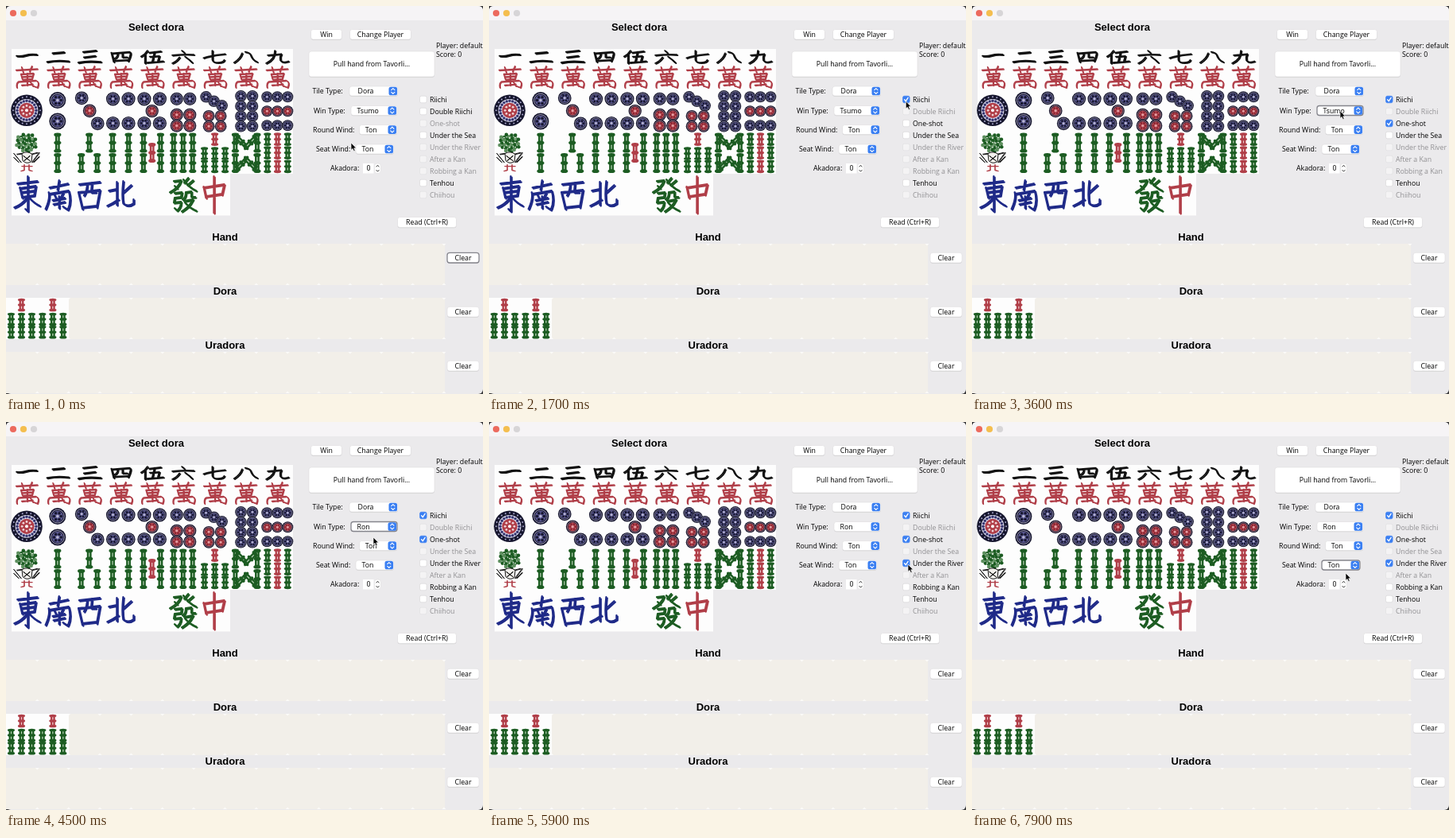
An HTML page that plays this animation: 600x488 px, repeating every 8 s.

```html
<!DOCTYPE html>
<html lang="en">
<head>
<meta charset="utf-8">
<title>Select dora</title>
<style>
html, body { margin: 0; width: 100%; height: 100%; overflow: hidden; background: #3a3a3c; }
svg { display: block; width: 600px; height: 488px; }
text { font: 500 8.75px "Open Sans", "Noto Sans", sans-serif; fill: #000; white-space: pre; }
text.head { font: bold 13px "Liberation Sans", Arial, sans-serif; text-anchor: middle; }
.mid { text-anchor: middle; }
</style>
</head>
<body>
<svg id="stage" viewBox="0 0 600 488" xmlns="http://www.w3.org/2000/svg"></svg>
<script>
const NS = 'http://www.w3.org/2000/svg';
const stage = document.getElementById('stage');
const W = 39.35, H = 52.3, X0 = 7, Y0 = 54;
const RED = '#b03e48', GREEN = '#1c5c22', BLUE = '#1f2a88', INK = '#111', NAVY = '#16162e', LILAC = '#5c5a92';

function add(parent, tag, attrs, content) {
  const el = document.createElementNS(NS, tag);
  for (const k in attrs) el.setAttribute(k, attrs[k]);
  if (content !== undefined) el.textContent = content;
  parent.appendChild(el);
  return el;
}
const rect = (p, x, y, width, height, fill, more) => add(p, 'rect', { x, y, width, height, fill, ...more });
const circle = (p, cx, cy, r, fill, more) => add(p, 'circle', { cx, cy, r, fill, ...more });
const label = (x, y, s, cls = '') => add(stage, 'text', { x, y, class: cls }, s);
const group = (p, x, y, turn = 0) => add(p, 'g', { transform: `translate(${x} ${y}) rotate(${turn})` });

// A flat nib: the same line laid down twice, slightly shifted
function brush(p, d, color, width, nib) {
  for (const s of [-nib / 2, nib / 2]) {
    add(p, 'path', { d, fill: 'none', stroke: color, 'stroke-width': width, 'stroke-linecap': 'round',
      'stroke-linejoin': 'round', transform: `translate(${s} ${s})` });
  }
}

function dot(p, x, y, r, red) {
  const g = group(p, x, y), pale = red ? '#e3a9ac' : '#b9b7d2';
  circle(g, 0, 0, r, NAVY);
  circle(g, 0, 0, r * .8, 'none', { stroke: pale, 'stroke-width': r * .08 });
  circle(g, 0, 0, r * .66, red ? '#c0505a' : LILAC);
  for (let a = 0; a < 6; a++) {
    const c = Math.cos(a * Math.PI / 3), s = Math.sin(a * Math.PI / 3);
    circle(g, r * .42 * c, r * .42 * s, r * .17, red ? '#8a2631' : NAVY);
  }
  circle(g, 0, 0, r * .17, pale);
}

function stick(p, x, y, h, red, turn) {
  const g = group(p, x, y, turn), c = red ? RED : GREEN, e = h / 2 - 1.8;
  rect(g, -2.9, -e, 5.8, 2 * e, c, { rx: 1.5 });
  for (const n of [-e, 0, e]) add(g, 'ellipse', { cx: 0, cy: n, rx: 4.6, ry: h > 18 ? 2.3 : 1.9, fill: c });
  for (const n of [-e / 2, e / 2]) rect(g, -.6, n - e * .26, 1.2, e * .52, red ? '#ecc8ca' : '#b9d2b6', { rx: .6 });
}

const numerals = [
  'M7 11Q12 12 18 10T32 9',
  'M13 7L27 5.5M6 20Q18 17 33 19',
  'M12 5L28 3M13 13L27 11M6 21Q18 18 34 20',
  'M8 6L11 20M9 7L31 5Q34 6 29 19M11 18L29 17M16 7Q16 13 12 15M22 6L22 13L28 13',
  'M14 3Q11 9 6 12M11 9L11 22M16 6L31 4M23 5L20 20M17 12L29 11L27 20M13 21L34 19',
  'M18 3L21 6M6 10Q20 8 33 9M15 13Q12 19 6 22M22 12Q27 16 31 21',
  'M6 14Q18 9 33 8M17 3L17 16Q17 21 24 21Q31 21 32 17',
  'M15 7Q13 15 5 21M19 5Q25 6 26 10Q28 17 34 20',
  'M8 10L25 8Q23 12 24 18Q27 22 34 19M17 3Q17 16 6 22'
];
const myriad = 'M6 27L33 25.5M13 23L15 30M26 22L23 29M12 32L14 39L26 38L28 31ZM13 35.5L27 34.5M20 31L20 46' +
  'M7 49Q6 43 9 41.5L31 40Q36 42 33 49L28 47M13 46L27 44.5M24 42L27 47';
const honors = [
  [BLUE, 'M8 13L33 10M11 18L14 31M11 19L31 16L29 28M13 24L30 22M14 30L29 28M21 4L21 48L18 45M20 31Q13 40 4 43M22 30Q29 38 36 41'],
  [BLUE, 'M9 18L32 13M21 9L19 21M8 24Q10 32 4 45M9 26L33 22Q37 35 32 46L26 42M15 27L17 31M26 25L23 31M13 34L28 31M14 39L28 36M21 29L21 44'],
  [BLUE, 'M7 14L33 11M17 13Q17 22 13 28M23 12L22 24L28 24M6 24L11 45M6 24L33 21L29 43M11 43L29 41'],
  [BLUE, 'M15 11L15 40M5 22L15 20M3 41Q10 38 17 33M33 15L23 24M23 10Q21 29 23 38Q29 43 36 38L36 33'],
  null,
  [GREEN, 'M8 10L17 9Q14 18 3 24M9 16L12 19M26 6L21 12M32 9L25 15M20 8Q27 18 36 22M9 25L18 24L17 30L9 31L8 37L17 36' +
    'Q17 43 12 47L9 44M23 24Q23 31 19 33M23 24L30 23L30 30L35 30M21 35L32 33Q28 42 18 48M22 37Q28 44 36 47'],
  [RED, 'M6 17L9 31M6 18L32 14L29 27M9 29L29 26M19 4L19 50']
];

function bigDot(g) {
  circle(g, 19, 25, 19.8, NAVY);
  circle(g, 19, 25, 14.4, '#d9d8ea');
  for (let i = 0; i < 20; i++) {
    const c = Math.cos(i * Math.PI / 10), s = Math.sin(i * Math.PI / 10);
    circle(g, 19 + 17 * c, 25 + 17 * s, 1, '#aaa8cc');
    circle(g, 19 + 12 * c, 25 + 12 * s, 1.7, '#34346e');
  }
  circle(g, 19, 25, 9.6, RED);
  for (let i = 0; i < 8; i++) {
    const a = i * Math.PI / 4;
    circle(g, 19 + 5.8 * Math.cos(a), 25 + 5.8 * Math.sin(a), 1.4, '#f0d5d8');
  }
  circle(g, 19, 25, 2, '#fff');
}

const dots = (g, xs, ys, r, red) => ys.forEach(y => xs.forEach(x => dot(g, x, y, r, red)));
const wide = [9.5, 29], mid = [11, 27.5];
const pins = [
  bigDot,
  g => dots(g, [18.5], [12.3, 38.7], 10.5),
  g => [9.5, 19.5, 29.5].forEach((x, i) => dot(g, x, 9.5 + i * 16, 8.4, i === 1)),
  g => dots(g, wide, [10.5, 41.2], 8.6),
  g => { dots(g, wide, [10.5, 41.2], 8.6); dot(g, 19.3, 25.8, 8.2, true); },
  g => { dots(g, mid, [10.5], 8.1); dots(g, mid, [30.5, 44.3], 8.1, true); },
  g => { [8.5, 18.5, 28.5].forEach((x, i) => dot(g, x, 8 + i * 5.5, 7.3)); dots(g, [12, 27], [32, 45], 7.4, true); },
  g => dots(g, [13, 27.5], [7, 19.6, 32.4, 45], 7.3),
  g => [8, 26, 44].forEach((y, r) => dots(g, [6.5, 19.5, 32.5], [y], 7, r === 1))
];

const sticks = (g, xs, ys, h, red) => ys.forEach(y => xs.forEach(x => stick(g, x, y, h, red)));

function bird(g) {
  for (let i = 0; i < 34; i++) {
    const a = i * 2.4, r = 2.05 * Math.sqrt(i);
    circle(g, 19 + r * Math.cos(a) * 1.15, 13.5 + r * Math.sin(a), 2.3, i % 3 ? GREEN : '#5d8f5e');
  }
  for (let i = 0; i < 9; i++) circle(g, 12 + i % 3 * 7, 7 + Math.floor(i / 3) * 6, .9, '#e7efe4');
  brush(g, 'M3 27L12 38M3 32L9 38M35 26L26 38M35 31L28 38M7 28L14 27M25 28L33 26', INK, 1, .6);
  add(g, 'path', { d: 'M13 27Q20 23 26 28L25 37Q19 41 14 36Z', fill: '#f3f1ed', stroke: INK, 'stroke-width': 1 });
  brush(g, 'M15 30L23 36M23 30L16 36', INK, 1, .3);
  brush(g, 'M16 41L16 48L12 49M22 41L22 48L26 49M13 43L26 43', RED, 1.1, .3);
}

const two = [13.5, 39];
const sous = [
  bird,
  g => sticks(g, [18.5], two, 24),
  g => { sticks(g, [19], [13.5], 24); sticks(g, [9, 29], [39], 24); },
  g => sticks(g, [9, 29], two, 24),
  g => { sticks(g, [8.5, 30], two, 24); stick(g, 19.3, 26, 24, true); },
  g => sticks(g, [7, 19, 31], two, 24),
  g => { stick(g, 19.5, 9, 16.5, true); sticks(g, [6.5, 19.5, 32.5], [27, 43.2], 16.5); },
  g => {
    sticks(g, [6, 33.5], two, 24);
    stick(g, 14.5, 13, 20, false, -45); stick(g, 25, 13, 20, false, 45);
    stick(g, 14.5, 39.5, 20, false, 45); stick(g, 25, 39.5, 20, false, -45);
  },
  g => { sticks(g, [7, 32.5], [9, 26, 43.2], 16.5); sticks(g, [19.7], [9, 26, 43.2], 16.5, true); }
];

// Window
rect(stage, 0, 0, 600, 488, '#ebeaec', { rx: 6 });
add(stage, 'path', { d: 'M0 18V6Q0 0 6 0H594Q600 0 600 6V18Z', fill: '#f6f4f6' });
['#ec6a5e', '#f4be4f', '#d7d5d7'].forEach((c, i) => circle(stage, 9 + 13 * i, 9, 4.1, c));
label(189, 31, 'Select dora', 'head');

// Tile chooser
rect(stage, X0, Y0, 354, 157, '#fdfdfd');
rect(stage, X0, Y0 + 156, 275, 53.5, '#fdfdfd');
for (let i = 0; i < 9; i++) {
  const cell = row => group(stage, X0 + i * W, Y0 + row * H);
  const man = cell(0);
  brush(add(man, 'g', { transform: 'scale(1 .84)' }), numerals[i], INK, i < 3 ? 2.5 : 2, 1.2);
  brush(man, myriad, RED, 1.5, .8);
  pins[i](cell(1));
  sous[i](cell(2));
  if (honors[i]) brush(cell(3), honors[i][1], honors[i][0], 2.3, 1.3);
}

// Buttons
function button(x, y, w, h, s) {
  rect(stage, x, y + .7, w, h, '#cfced0', { rx: 3 });
  const face = rect(stage, x, y, w, h, '#fff', { rx: 3, stroke: '#dddcde', 'stroke-width': .6 });
  label(x + w / 2, y + h / 2 + 3.2, s, 'mid');
  return face;
}
button(383.5, 29.5, 39, 12.5, 'Win');
button(432.5, 29.5, 77, 12.5, 'Change Player');
button(381, 57, 158, 32, 'Pull hand from Tavorli...');
button(492.5, 265.5, 74, 13, 'Read (Ctrl+R)');
label(541, 53, 'Player: default');
label(541, 63.5, 'Score: 0');

// Tile trays, with pale notches where the blank tiles meet
let clearFace;
['Hand', 'Dora', 'Uradora'].forEach((name, i) => {
  const y = 299 + 68 * i;
  label(275.5, y - 4, name, 'head');
  rect(stage, 0, y, 552, 52, '#f2efe9');
  for (let k = 1; k < 15; k++) {
    const x = k * W;
    add(stage, 'path', { d: `M${x - 2.5} ${y}h5l-2.5 2.5zM${x - 2.5} ${y + 52}h5l-2.5-2.5z`, fill: '#fbfaf8' });
  }
  const face = button(555, y + 11.3, 40, 12.7, 'Clear');
  if (!i) clearFace = face;
});
rect(stage, 0, 367, 79, 52, '#fdfdfd');
[0, W].forEach(x => sous[6](group(stage, x, 367)));

// Drop-downs
function combo(name, nx, base, x, w, tx, value) {
  label(nx, base, name);
  const y = base - 9.2;
  rect(stage, x, y + .7, w, 12, '#cfced0', { rx: 3 });
  const face = rect(stage, x, y, w, 12, '#fff', { rx: 3, stroke: '#dddcde', 'stroke-width': .6 });
  const kx = x + w - 11.5;
  rect(stage, kx, y + .7, 10.6, 10.6, '#3a7ff2', { rx: 2.6 });
  add(stage, 'path', { d: `M${kx + 3.2} ${y + 4.7}l2.1-2.1 2.1 2.1m0 2.6l-2.1 2.1-2.1-2.1`, fill: 'none',
    stroke: '#fff', 'stroke-width': 1.1, 'stroke-linecap': 'round', 'stroke-linejoin': 'round' });
  return { face, text: label(tx, base, value) };
}
combo('Tile Type:', 385.5, 110.2, 432, 61, 442.5, 'Dora');
const win = combo('Win Type:', 387, 134.7, 434, 58, 441.5, 'Tsumo');
combo('Round Wind:', 386, 158.8, 444.5, 47.5, 451.8, 'Ton');
const seat = combo('Seat Wind:', 390, 183.2, 440, 48, 447.5, 'Ton');

label(408, 207.3, 'Akadora:');
rect(stage, 449, 198, 13.5, 12.5, '#fff');
label(456, 207.3, '0', 'mid');
rect(stage, 463.5, 198, 8, 12.5, '#fff', { rx: 3.5, stroke: '#dddcde', 'stroke-width': .6 });
add(stage, 'path', { d: 'M465.7 202.3l1.8-2 1.8 2m0 3.9l-1.8 2-1.8-2', fill: 'none', stroke: '#333', 'stroke-width': 1 });

// Check boxes
const boxes = ['Riichi', 'Double Riichi', 'One-shot', 'Under the Sea', 'Under the River', 'After a Kan',
  'Robbing a Kan', 'Tenhou', 'Chiihou'].map((name, i) => {
  const y = 113.2 + 15 * i;
  const box = rect(stage, 520.5, y, 8.6, 8.6, '#fff', { rx: 2, 'stroke-width': .6 });
  const tick = add(stage, 'path', { d: `M522.6 ${y + 4.6}l1.7 1.9 2.8-4.4`, fill: 'none', stroke: '#fff',
    'stroke-width': 1.3, 'stroke-linecap': 'round', 'stroke-linejoin': 'round' });
  return { box, tick, text: label(533, y + 7.8, name) };
});
function setBox(i, on, enabled) {
  const { box, tick, text } = boxes[i];
  box.setAttribute('fill', on ? '#3a7ff2' : enabled ? '#fff' : '#f4f3f4');
  box.setAttribute('stroke', on ? '#3a7ff2' : enabled ? '#d3d2d4' : '#dedddf');
  tick.setAttribute('opacity', on ? 1 : 0);
  text.style.fill = enabled ? '#000' : '#919093';
}
function setFocus(face, on) {
  face.setAttribute('stroke', on ? '#85858c' : '#dddcde');
  face.setAttribute('stroke-width', on ? 1.3 : .6);
}

const pointer = add(stage, 'path', { d: 'M0 0V9.3L2.1 7.4L3.6 10.6L5.2 9.9L3.8 6.8H6.6Z', fill: '#000',
  stroke: '#fff', 'stroke-width': .7, 'stroke-linejoin': 'round' });

// time, x, y
const track = [
  [0, 434, 172], [100, 436, 171], [700, 518, 121], [1000, 524, 117], [1600, 524, 117], [2100, 527, 144], [2900, 527, 144],
  [3500, 463, 132], [3800, 463, 132], [4100, 462, 145], [4500, 462, 145], [5200, 527, 179], [5900, 527, 179],
  [6600, 471, 154], [6800, 471, 154], [7100, 471, 179], [7400, 471, 179], [7800, 470, 190], [8000, 470, 190]
];
function pointerAt(t) {
  let i = 0;
  while (i < track.length - 2 && t >= track[i + 1][0]) i++;
  const [t0, x0, y0] = track[i], [t1, x1, y1] = track[i + 1];
  const u = (t - t0) / (t1 - t0), e = u * u * (3 - 2 * u);
  return [x0 + (x1 - x0) * e, y0 + (y1 - y0) * e];
}

function draw(t) {
  const riichi = t >= 1300, shot = t >= 2300, ron = t >= 4300, river = t >= 5600;
  const on = [riichi, false, shot, false, river];
  const enabled = [true, !riichi, riichi, !ron, ron, false, ron, true, false];
  enabled.forEach((e, i) => setBox(i, !!on[i], e));
  win.text.textContent = ron ? 'Ron' : 'Tsumo';
  setFocus(clearFace, !riichi);
  setFocus(win.face, t >= 3500 && !river);
  setFocus(seat.face, t >= 7400);
  pointer.setAttribute('transform', `translate(${pointerAt(t)})`);
}

const start = performance.now();
function frame() {
  draw(Math.floor((performance.now() - start) % 8000 / 100) * 100);
  requestAnimationFrame(frame);
}
frame();
</script>
</body>
</html>
```
